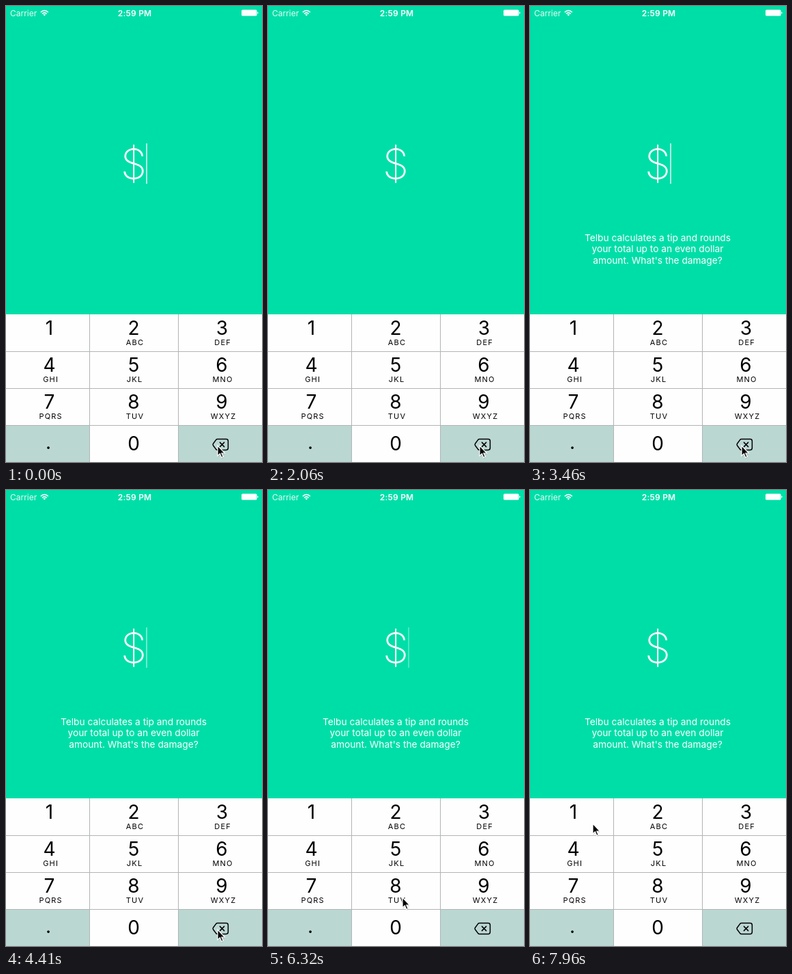
Animation, 375 px wide and 667 px high, one loop 8 s. Source, as an HTML page:

```html
<!DOCTYPE html>
<html lang="en">
<head>
<meta charset="utf-8">
<title>Tip calculator</title>
<style>
  html, body { margin: 0; width: 100%; height: 100%; overflow: hidden; background: #00dea8; }
  svg { display: block; width: 375px; height: 667px; font-family: Inter, Roboto, sans-serif; }
  text { text-anchor: middle; }
  .status { font-size: 12px; fill: #fff; }
  .digit { font-size: 28px; }
  .letters { font-size: 11px; letter-spacing: 1.2px; }
  .hint { font-size: 13.75px; fill: #fff; }
</style>
</head>
<body>
<svg viewBox="0 0 375 667">
  <rect width="375" height="667" fill="#00dea8"/>

  <g class="status">
    <text x="6" y="14.5" style="text-anchor:start" opacity=".9">Carrier</text>
    <g fill="none" stroke="#fff" stroke-width="1.6">
      <path d="M50.8 9.2Q56.3 4.2 61.8 9.2"/>
      <path d="M52.9 11.4Q56.3 8.4 59.7 11.4"/>
    </g>
    <path d="M54.4 12.4Q56.3 11 58.2 12.4L56.3 14.4Z"/>
    <text x="188.6" y="14.5" font-weight="600" letter-spacing=".2">2:59 PM</text>
    <rect x="345" y="5.5" width="22.5" height="9" rx="1.6"/>
    <path d="M368.2 8.4Q369.6 8.7 369.6 10T368.2 11.6Z"/>
  </g>

  <text x="187" y="252.6" font-size="61" font-weight="200" fill="#fff">$</text>
  <rect id="caret" x="205.3" y="201" width="1.4" height="59" fill="#fff"/>

  <g id="hint" class="hint">
    <text x="187" y="343.5">Telbu calculates a tip and rounds</text>
    <text x="187" y="360.3">your total up to an even dollar</text>
    <text x="187" y="377">amount. What's the damage?</text>
  </g>

  <rect y="451" width="375" height="216" fill="#fefefe"/>
  <path d="M0 613.5H122.5V667H0ZM252.5 613.5H375V667H252.5Z" fill="#bbd7d2"/>
  <path d="M122.5 451V667M252.5 451V667M0 505.5H375M0 559.5H375M0 613.5H375" stroke="#b2b5b5" fill="none"/>
  <g id="keys"></g>
  <g fill="none" stroke="#000" stroke-width="1.5" stroke-linejoin="round" stroke-linecap="round">
    <path d="M309.6 633.6H322.6Q325.4 633.6 325.4 636.4V646.6Q325.4 649.4 322.6 649.4H309.6Q308.6 649.4 307.8 648.6L303.6 643Q302.6 641.5 303.6 640L307.8 634.4Q308.6 633.6 309.6 633.6Z"/>
    <path d="M313.4 638.4L319.6 644.6M319.6 638.4L313.4 644.6"/>
  </g>

  <g id="pointer">
    <path d="M0 0V15L3.4 11.8L5.8 17.4L8.2 16.4L5.8 11H10.4Z" transform="translate(.5 1.4)" opacity=".2"/>
    <path d="M0 0V15L3.4 11.8L5.8 17.4L8.2 16.4L5.8 11H10.4Z" stroke="#fff" stroke-width="1.2"/>
  </g>
</svg>
<script>
const LOOP = 8000;
const FADE = 100;
const byId = id => document.getElementById(id);

// Digit, digit x, baseline, letters, letters x
const keys = [
  ['1', 63.5, 481], ['2', 187, 481, 'ABC', 189], ['3', 316.5, 481, 'DEF', 317.6],
  ['4', 63.5, 535, 'GHI', 65.6], ['5', 187, 535, 'JKL', 188.6], ['6', 316, 535, 'MNO', 317.6],
  ['7', 63.5, 589, 'PQRS', 65.6], ['8', 187, 589, 'TUV', 189], ['9', 316, 589, 'WXYZ', 318.6],
  ['.', 62, 648], ['0', 187, 650],
];
const label = (cls, text, x, y) => `<text class="${cls}" x="${x}" y="${y}">${text}</text>`;
byId('keys').innerHTML = keys.map(([digit, x, y, letters, lettersX]) =>
  label('digit', digit, x, y) + (letters ? label('letters', letters, lettersX, y + 15) : '')
).join('');

// Caret fades, alternately out and in
const caretFades = [5, 455, 985, 1410, 1935, 2365, 2895, 3350, 3850, 4350, 4850, 5330, 5820, 6280, 6835, 7280, 7830];

const pointerMoves = [
  { start: 5160, end: 5400, from: [310, 643], via: [272, 623], to: [197, 596], ease: p => 1 - (1 - p) ** 1.5 },
  { start: 6325, end: 6650, from: [197, 596], via: [162, 559], to: [127, 522], ease: smooth },
  { start: 7290, end: 7960, from: [127, 522], via: [109, 505], to: [92, 488], ease: smooth },
];

function smooth(p) { return p * p * (3 - 2 * p); }
function progress(t, start, end) { return Math.min(1, Math.max(0, (t - start) / (end - start))); }
function mix(a, b, p) { return a + (b - a) * p; }

function caretOpacity(t) {
  const i = caretFades.findLastIndex(start => start <= t);
  if (i < 0) return 1;
  const p = progress(t, caretFades[i], caretFades[i] + FADE);
  return i % 2 ? p : 1 - p;
}

function pointerPosition(t) {
  const move = pointerMoves.findLast(m => m.start <= t) || pointerMoves[0];
  const p = move.ease(progress(t, move.start, move.end));
  const bend = (move.via[0] - move.from[0]) / (move.to[0] - move.from[0]);
  return [0, 1].map(axis => p < bend
    ? mix(move.from[axis], move.via[axis], p / bend)
    : mix(move.via[axis], move.to[axis], (p - bend) / (1 - bend)));
}

function render() {
  const t = performance.now() % LOOP;
  byId('caret').setAttribute('opacity', caretOpacity(t));
  byId('hint').setAttribute('opacity', progress(t, 3260, 3450));
  byId('pointer').setAttribute('transform', `translate(${pointerPosition(t)})`);
  requestAnimationFrame(render);
}
render();
</script>
</body>
</html>
```
